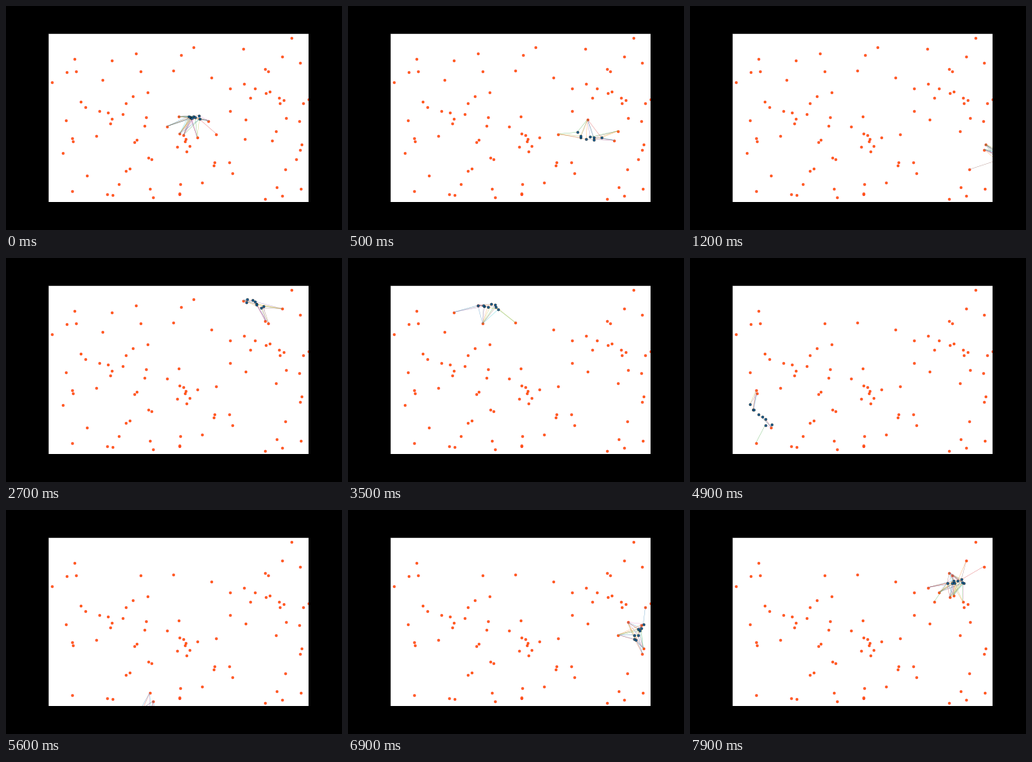
A matplotlib script that plays this animation: 432x288 px, repeating every 8000 ms.

```python
import numpy as np
import matplotlib.pyplot as plt
from matplotlib.animation import FuncAnimation
from matplotlib.collections import LineCollection

FRAMES, INTERVAL = 80, 100
SIGHT, ASPECT = 41, 1.55  # sight radius in x pixels; y distances weigh more
AGENTS, SCATTERED = 8, 63

# Stops of the swarm: step, x, y. It eats at the meals and turns at the others.
MEALS = [(2, 260, 148), (5, 307, 171), (7, 342, 173), (9, 373, 197),
         (28, 305, 55), (31, 241, 53), (32, 225, 63), (36, 167, 61),
         (38, 136, 70), (39, 124, 95), (48, 73, 189), (50, 104, 218),
         (53, 145, 229), (70, 377, 148), (72, 382, 125), (73, 389, 120)]
TURNS = [(-2, 227, 141), (12, 400, 194), (16, 407, 160), (19, 388, 127),
         (23, 350, 90), (42, 65, 119), (45, 44, 156), (56, 188, 265),
         (60, 270, 288), (63, 309, 232), (76, 374, 97), (81, 320, 92)]
# Food the swarm sees on its way but leaves alone
SIGHTS = [(207, 155), (228, 166), (270, 165), (288, 135), (333, 81),
          (337, 84), (90, 84), (96, 123), (102, 130), (77, 147),
          (347, 161), (378, 185), (306, 100), (320, 106), (189, 246)]

stops = np.array(sorted(MEALS + TURNS), float)
times, places = stops[:, 0], stops[:, 1:]
speeds = np.gradient(places, times, axis=0)


def route(t):
    """Smooth cubic path through the stops."""
    k = np.clip(np.searchsorted(times, t, side="right") - 1, 0, len(times) - 2)
    span = (times[k + 1] - times[k])[:, None]
    u = (t - times[k])[:, None] / span
    ease = u * u * (3 - 2 * u)
    return ((1 - ease) * places[k] + ease * places[k + 1]
            + span * u * (1 - u) * ((1 - u) * speeds[k] - u * speeds[k + 1]))


rng = np.random.default_rng(4)
lags = np.linspace(-0.9, 0.9, AGENTS)
phases = rng.uniform(0, 2 * np.pi, (AGENTS, 2))


def swarm(step):
    """Agents follow one route, each a little later and off to the side."""
    return route(step + lags) + 2.5 * np.sin(0.3 * step + phases)


def scatter_food(count):
    """Random food that keeps clear of the route."""
    path = route(np.arange(0, FRAMES, 0.25))
    food = []
    while len(food) < count:
        spot = rng.uniform((56, 37), (389, 251))
        if np.hypot(*(path - spot).T).min() > 16:
            food.append(spot)
    return food


lasting = np.array(SIGHTS + scatter_food(SCATTERED))
meals = np.array(MEALS)

fig = plt.figure(figsize=(6, 4), dpi=72, facecolor="black")
ax = fig.add_axes([0.125, 0.125, 0.775, 217 / 288])
ax.set(xlim=(53.5, 388.3), ylim=(252.5, 35.5), xticks=[], yticks=[])

dots = dict(marker=".", ms=6, mew=0.5, ls="")
food_dots, = ax.plot([], [], mfc="tab:orange", mec="red", zorder=2, **dots)
links = ax.add_collection(
    LineCollection([], linewidths=0.4, alpha=0.6, zorder=3))
agent_dots, = ax.plot([], [], mfc="tab:blue", mec="black", zorder=4, **dots)


def update(step):
    food = np.vstack([lasting, meals[meals[:, 0] > step, 1:]])
    agents = swarm(step)
    gap = food[None] - agents[:, None]
    near = np.argwhere(np.hypot(gap[..., 0], ASPECT * gap[..., 1]) < SIGHT)
    food_dots.set_data(*food.T)
    links.set_segments([(agents[a], food[f]) for a, f in near])
    links.set_color([f"C{(3 * a + f) % 10}" for a, f in near])
    agent_dots.set_data(*agents.T)
    return food_dots, links, agent_dots


anim = FuncAnimation(fig, update, frames=FRAMES, interval=INTERVAL,
                     repeat=True, repeat_delay=0)
plt.show()
```
